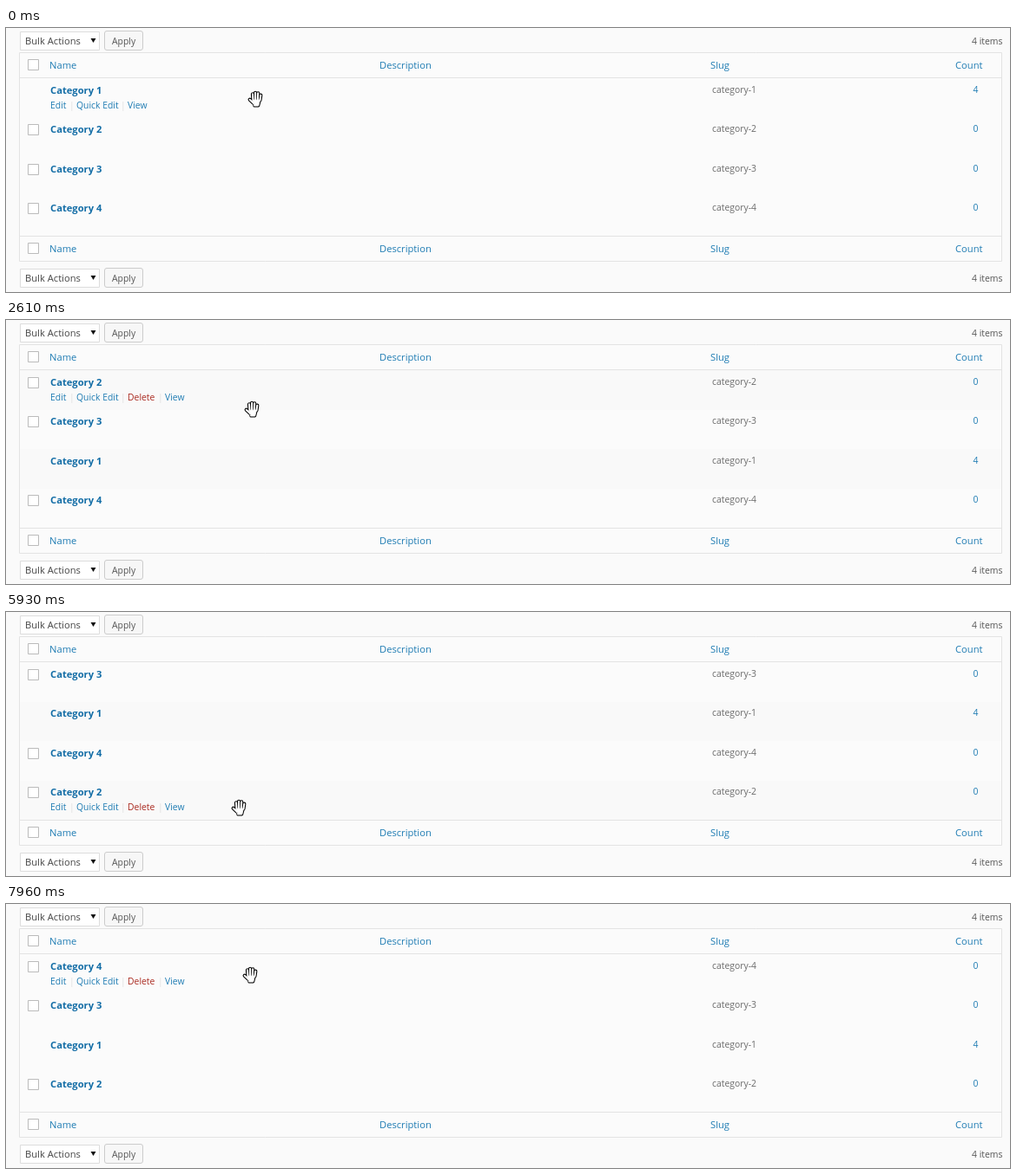
Animation, 1156 px wide and 305 px high, one loop 8000 ms. Source, as an HTML page with a canvas:

```html
<!DOCTYPE html>
<html lang="en">
<head>
<meta charset="utf-8">
<title>Sortable categories</title>
<style>
  html, body { margin: 0; width: 1156px; height: 305px; overflow: hidden; background: #fafafa; }
  canvas { display: block; }
</style>
</head>
<body>
<canvas id="stage" width="1156" height="305"></canvas>
<script>
const ctx = document.getElementById('stage').getContext('2d');
const LOOP = 8000, STEP = 137, TOP = 58, PITCH = 45.6, LIFT = 4;
const LINK = '#1f7cb3', BOLD = '#136da6', GREY = '#6a6a6a', EDGE = '#e3e3e3';

// The pointer glides to a row, grabs it at `start`, arrives at `settle`, drops it at `end`.
// x and grab (pointer height inside the row) run from their first to their second value.
const drags = [
  { id: 1, glide: 0, reach: 150, start: 150, settle: 1110, end: 1410,
    slot: 0, to: 100, x: [287, 280], grab: [27, 27], power: 2.05 },
  { id: 2, glide: 1680, reach: 2610, start: 3260, settle: 4500, end: 5020,
    slot: 0, to: 147.5, x: [283, 268], grab: [38, 23], power: 1.15 },
  { id: 4, glide: 5930, reach: 6204, start: 6204, settle: 7170, end: 7570,
    slot: 2, to: -10.5, x: [276, 281], grab: [29, 29], power: 0.85 },
  { id: 4, glide: 7570, reach: 7960, start: LOOP, settle: LOOP, end: LOOP,
    slot: 0, to: 0, x: [281, 281], grab: [27, 27], power: 1 }
];

const mix = (a, b, k) => a + (b - a) * k;

// Progress from a to b in even jumps
function progress(t, a, b) {
  const steps = Math.floor((t - a) / STEP + 0.2);
  return Math.max(0, Math.min(1, steps * STEP / (b - a)));
}

function pose(drag, p) {
  const k = p ** drag.power;
  const y = mix(drag.slot * PITCH, drag.to, k);
  return { y, px: mix(...drag.x, k), py: TOP + y + mix(...drag.grab, k) };
}

function move(order, { id, slot }, y) {
  const target = slot + Math.trunc((y - slot * PITCH) / PITCH);
  order.splice(order.indexOf(id), 1);
  order.splice(Math.max(0, target), 0, id);
}

function stateAt(t) {
  const order = [1, 2, 3, 4];
  let rest = pose(drags[0], 0);
  for (const drag of drags) {
    if (t < drag.start) {
      const next = pose(drag, 0), k = progress(t, drag.glide, drag.reach);
      return { order, held: 0, px: mix(rest.px, next.px, k), py: mix(rest.py, next.py, k) - LIFT };
    }
    if (t < drag.end) {
      const now = pose(drag, progress(t, drag.start, drag.settle));
      move(order, drag, now.y);
      return { order, held: drag.id, ...now };
    }
    rest = pose(drag, 1);
    move(order, drag, rest.y);
  }
}

function text(str, x, y, color = LINK, size = 10.4, weight = 400) {
  ctx.font = `${weight} ${size}px "Open Sans", sans-serif`;
  ctx.fillStyle = color;
  ctx.fillText(str, x, y);
}

function box(x, y, w, h, fill, edge, r = 0) {
  ctx.beginPath();
  ctx.roundRect(x + 0.5, y + 0.5, w - 1, h - 1, r);
  ctx.fillStyle = fill;
  ctx.fill();
  ctx.strokeStyle = edge;
  ctx.lineWidth = 1;
  ctx.stroke();
}

const checkbox = y => box(25, y, 13, 13, '#fff', '#bbb');

function rule(y) {
  ctx.fillStyle = EDGE;
  ctx.fillRect(16, y, 1130, 1);
}

function toolbar(y) {
  box(16, y, 92, 22, '#fff', '#ddd');
  text('Bulk Actions', 22, y + 15, '#444', 11.2);
  ctx.fillStyle = '#111';
  ctx.beginPath();
  ctx.moveTo(97.5, y + 8);
  ctx.lineTo(103.5, y + 8);
  ctx.lineTo(100.5, y + 13);
  ctx.fill();
  box(113, y - 1, 45, 23, '#f7f7f7', '#ccc', 2.5);
  text('Apply', 122, y + 15, '#555');
  text('4 items', 1112, y + 15, '#555');
}

function heading(y) {
  checkbox(y - 11);
  text('Name', 50, y, LINK, 11.2);
  text('Description', 430, y, LINK, 11.2);
  text('Slug', 811, y, LINK, 11.2);
  text('Count', 1093, y, LINK, 11.2);
}

function actions(id, y) {
  const items = [['Edit', 51], ['Quick Edit', 81]];
  if (id === 1) items.push(['View', 140]);
  else items.push(['Delete', 140], ['View', 183]);
  items.forEach(([label, x], i) => {
    if (i) text('|', x - 8, y, '#ddd');
    text(label, x, y, label === 'Delete' ? '#aa2a20' : LINK);
  });
}

function row(id, y, shaded, active, lifted) {
  const top = Math.round(TOP + y), base = Math.floor(76 + y);
  ctx.fillStyle = shaded ? '#f9f9f9' : '#fbfbfb';
  ctx.fillRect(16, top, 1130, Math.round(TOP + y + PITCH) - top);
  if (id !== 1) checkbox(base - 10);
  text('Category ' + id, 51, base, BOLD, 11.2, 700);
  text('category-' + id, lifted ? 797 : 813, base - 1, GREY);
  text(id === 1 ? '4' : '0', lifted ? 1105.5 : 1113.5, base - 1);
  if (active) actions(id, base + 17);
}

function hand(x, y, closed) {
  const reach = closed ? 4.1 : 7.2, base = closed ? 5.2 : 8;
  const shape = new Path2D();
  shape.moveTo(-0.85 * base, 0.8);
  shape.lineTo(-2.6, 0.6 * base);
  for (let i = 0; i < 4; i++) {
    const fx = 3.1 * i - 3.5;
    shape.moveTo(fx, reach * (0.13 * (i - 1.25) ** 2 - 1));
    shape.lineTo(0.85 * fx, 1.5);
  }
  const palm = new Path2D(`M-3 1.2L4.9 1.2L3.2 ${base}L-1.6 ${base}Z`);
  ctx.save();
  ctx.translate(x, y);
  ctx.lineCap = ctx.lineJoin = 'round';
  for (const [color, width] of [['#000', 4.2], ['#fff', 2.1]]) {
    ctx.strokeStyle = ctx.fillStyle = color;
    ctx.lineWidth = width;
    ctx.stroke(shape);
    ctx.lineWidth = width - 1.2;
    ctx.fill(palm);
    ctx.stroke(palm);
  }
  ctx.restore();
}

function draw(t) {
  const { order, held, y, px, py } = stateAt(t);
  const hover = Math.floor((py - TOP) / PITCH);
  const striped = t >= drags[0].end && t < drags[2].end;
  const shaded = id => striped && id < 3;

  ctx.fillStyle = '#fafafa';
  ctx.fillRect(0, 0, 1156, 305);
  toolbar(4);
  toolbar(278);
  box(15, 28, 1132, 242, '#fbfbfb', EDGE);
  order.forEach((id, i) => {
    if (id !== held) row(id, i * PITCH, shaded(id), !held && i === hover);
  });
  rule(57);
  rule(240);
  heading(47);
  heading(259);
  if (held) row(held, y, shaded(held), true, true);
  hand(Math.round(px) + 0.5, Math.round(py) + (held ? 0 : 1), held);
}

function tick() {
  draw(performance.now() % LOOP);
  requestAnimationFrame(tick);
}
tick();
</script>
</body>
</html>
```
